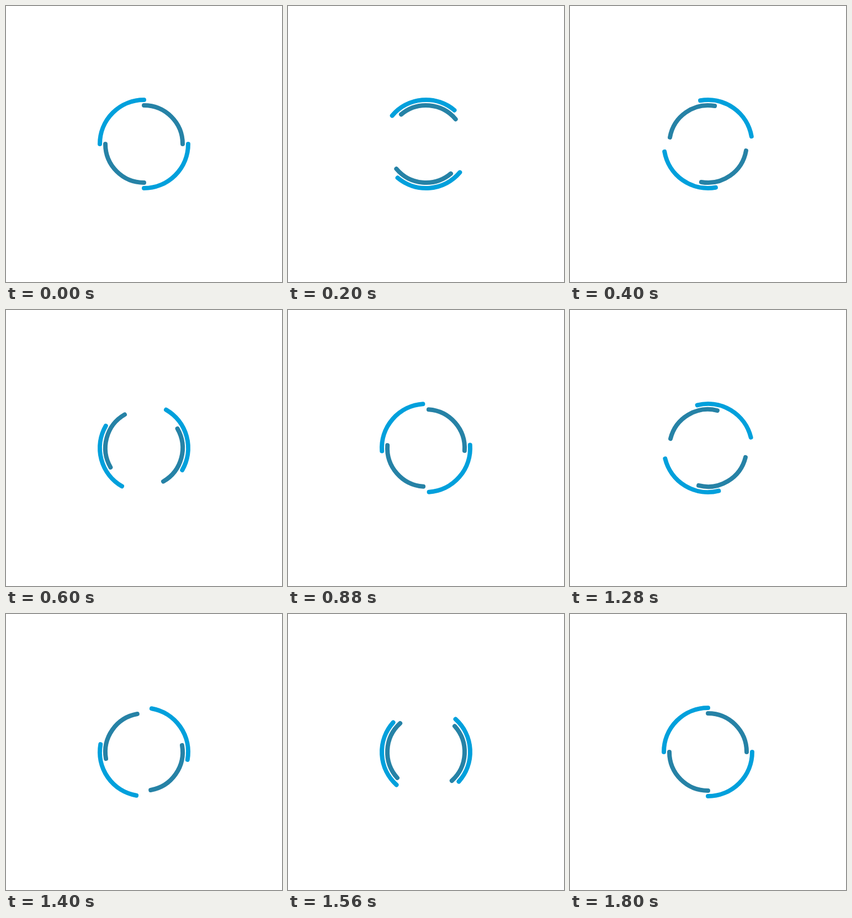
An HTML page that plays this animation: 500 by 500 pixels, repeating every 1840 ms.

```html
<!DOCTYPE html>
<html lang="en">
<head>
<meta charset="utf-8">
<title>Loading</title>
<style>
  html, body { margin: 0; width: 100%; height: 100%; overflow: hidden; background: #fff; }
  svg { display: block; width: 100vw; height: 100vh; }
</style>
</head>
<body>
<svg viewBox="0 0 500 500">
  <g fill="none" stroke-width="8" stroke-linecap="round">
    <path id="outer" stroke="#00a0dc" d="M170 250A80 80 0 0 1 250 170M330 250A80 80 0 0 1 250 330"/>
    <path id="inner" stroke="#2682a6" d="M250 180A70 70 0 0 1 320 250M250 320A70 70 0 0 1 180 250"/>
  </g>
</svg>
<script>
  const STEP_MS = 40;
  const LOOP_MS = 1840;
  const STEP_DEG = 8;
  const outer = document.getElementById('outer');
  const inner = document.getElementById('inner');

  const turn = (ring, degrees) => ring.setAttribute('transform', `rotate(${degrees} 250 250)`);

  // The rings turn in opposite directions; the last step repeats the first pose.
  function render(time) {
    const angle = Math.floor((time % LOOP_MS) / STEP_MS) * STEP_DEG;
    turn(outer, angle);
    turn(inner, -angle);
  }

  const start = performance.now();
  function tick() {
    render(performance.now() - start);
    requestAnimationFrame(tick);
  }
  tick();
</script>
</body>
</html>
```
